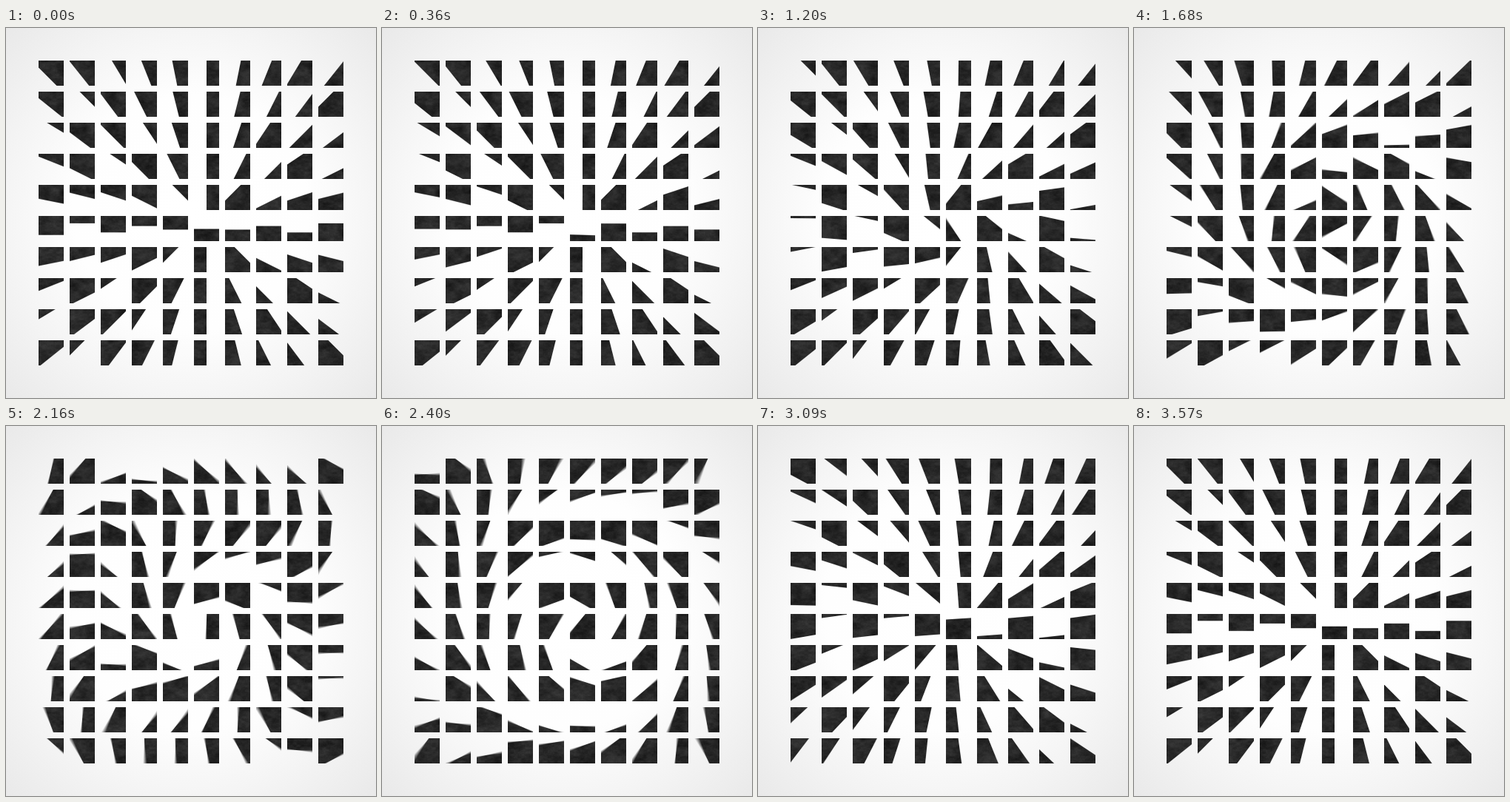
Write an HTML page with a canvas that moves like this. It is 500 px wide and 500 px high and loops after 3.6 s.

```html
<!DOCTYPE html>
<html lang="en">
<head>
<meta charset="utf-8">
<title>Turning tiles</title>
<style>
  html, body { margin: 0; width: 100%; height: 100%; overflow: hidden; background: #fff; }
  canvas { display: block; width: 500px; height: 500px; }
</style>
</head>
<body>
<canvas id="stage" width="500" height="500"></canvas>
<script>
const SIZE = 500, LOOP = 3600, STEP = 30;
const N = 10, PITCH = 42, TILE = 34, START = 44, HUB = 5;
const SWAY = 14;          // vertical travel of each edge
const SAMPLES = 8;        // motion blur
const MAX_R = HUB * Math.SQRT2;

const ctx = document.getElementById('stage').getContext('2d');

function layer() {
  const c = document.createElement('canvas');
  c.width = c.height = SIZE;
  return c.getContext('2d');
}

function hash(x, y) {
  let h = Math.imul(x, 374761393) ^ Math.imul(y, 668265263) ^ 977;
  h = Math.imul(h ^ (h >>> 13), 1274126177);
  return ((h ^ (h >>> 16)) >>> 0) / 4294967296;
}

function noise(x, y) {
  const ix = Math.floor(x), iy = Math.floor(y);
  const s = v => v * v * (3 - 2 * v);
  const u = s(x - ix), v = s(y - iy);
  const mix = (a, b, k) => a + (b - a) * k;
  return mix(mix(hash(ix, iy), hash(ix + 1, iy), u),
             mix(hash(ix, iy + 1), hash(ix + 1, iy + 1), u), v);
}

// Mottled charcoal
function makeTexture() {
  const g = layer();
  const img = g.createImageData(SIZE, SIZE);
  for (let y = 0, i = 0; y < SIZE; y++) {
    for (let x = 0; x < SIZE; x++, i += 4) {
      const v = 39 + 22 * (noise(x / 13, y / 10) - 0.5)
                   + 14 * (noise(x / 5, y / 3) - 0.5)
                   + 8 * (noise(x / 1.7, y / 1.3) - 0.5);
      img.data[i] = img.data[i + 1] = img.data[i + 2] = v;
      img.data[i + 3] = 255;
    }
  }
  g.putImageData(img, 0, 0);
  return g.canvas;
}

function makeBackdrop() {
  const g = layer();
  const grad = g.createRadialGradient(250, 250, 0, 250, 250, 354);
  grad.addColorStop(0, '#ffffff');
  grad.addColorStop(0.45, '#fefefe');
  grad.addColorStop(0.72, '#f4f4f4');
  grad.addColorStop(1, '#e9e9e9');
  g.fillStyle = grad;
  g.fillRect(0, 0, SIZE, SIZE);
  return g.canvas;
}

const texture = makeTexture(), backdrop = makeBackdrop(), mask = layer();

const tiles = [];
for (let row = 0; row < N; row++) {
  for (let col = 0; col < N; col++) {
    const dx = col - HUB, dy = row - HUB;
    tiles.push({
      x: START + col * PITCH,
      y: START + row * PITCH,
      r: Math.hypot(dx, dy),
      base: Math.atan2(dy, dx)
    });
  }
}

const ease = x => x < 0.5 ? 4 * x ** 3 : 1 - 4 * (1 - x) ** 3;

// Half plane on the clockwise side of a line through (x, y)
function halfPlane(g, x, y, angle) {
  const c = Math.cos(angle) * 70, s = Math.sin(angle) * 70;
  g.beginPath();
  g.moveTo(x - c, y - s);
  g.lineTo(x + c, y + s);
  g.lineTo(x + c - s, y + s + c);
  g.lineTo(x - c - s, y - s + c);
  g.fill();
}

function drawTile(tile, time) {
  const { x, y, r, base } = tile;
  const wait = 0.4 * r / MAX_R;
  mask.save();
  mask.beginPath();
  mask.rect(x, y, TILE, TILE);
  mask.clip();
  for (let k = 0; k < SAMPLES; k++) {
    const t = (time + 6 + STEP * (k + 0.5) / SAMPLES) / LOOP;
    const p = Math.min(1, Math.max(0, (t - wait) / (1 - wait)));
    const sway = SWAY * Math.sin(2 * Math.PI * t + 3 * r);
    halfPlane(mask, x + TILE / 2, y + TILE / 2 + sway, base + 2 * Math.PI * ease(p));
  }
  mask.restore();
}

function draw(time) {
  mask.globalCompositeOperation = 'source-over';
  mask.clearRect(0, 0, SIZE, SIZE);
  mask.globalCompositeOperation = 'lighter';
  mask.fillStyle = `rgba(0,0,0,${1 / SAMPLES})`;
  for (const tile of tiles) drawTile(tile, time);
  mask.globalCompositeOperation = 'source-in';
  mask.drawImage(texture, 0, 0);
  ctx.drawImage(backdrop, 0, 0);
  ctx.drawImage(mask.canvas, 0, 0);
}

let shown = -1;
function tick() {
  const time = Math.floor((performance.now() % LOOP) / STEP) * STEP;
  if (time !== shown) draw(shown = time);
  requestAnimationFrame(tick);
}
tick();
</script>
</body>
</html>
```
